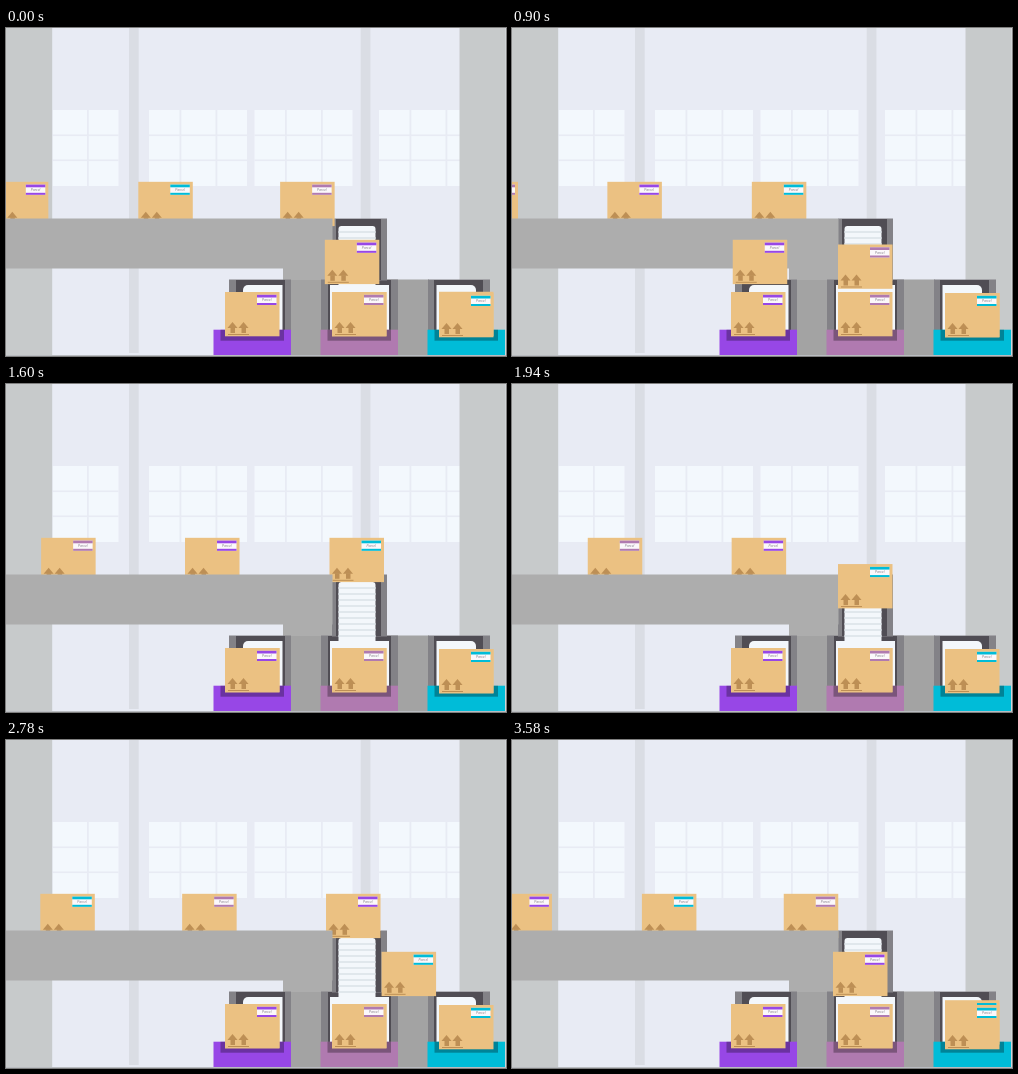
An HTML page with a canvas for the animation above (3.6 s loop, 500 by 328 pixels).

```html
<!DOCTYPE html>
<html lang="en">
<head>
<meta charset="utf-8">
<style>
  html, body { margin: 0; width: 100%; height: 100%; overflow: hidden; }
  canvas { display: block; }
</style>
</head>
<body>
<canvas id="stage" width="500" height="328"></canvas>
<script>
const ctx = document.getElementById('stage').getContext('2d');
const LOOP = 3600, BELT_SPEED = 0.1195;
const EDGE = 326, BIN_GAP = 107;
const BELT_Y = 153.8, SLIDE_Y = 211.8;
const FALL = 704, SLIDE = 982;
const GREY = '#838287', DARK = '#504d54', SLOT = '#f3f7fb';

// side: which bin the parcel goes to; edge: time it leaves the belt;
// drop: duration of the final fall; floor: resting height.
const parcels = [
  { color: '#9747e6', side: -1, edge: 2831, drop: 415, floor: 264 },
  { color: '#b07ab0', side: 0, edge: 435, drop: 898, floor: 264 },
  { color: '#00bcd8', side: 1, edge: 1622, drop: 300, floor: 265 }
];

const mix = (a, b, k) => a + (b - a) * k;
const progress = (time, duration) => Math.min(1, Math.max(0, time / duration));
const binX = side => EDGE + side * BIN_GAP;

function rect(color, x, y, w, h) {
  ctx.fillStyle = color;
  ctx.fillRect(x, y, w, h);
}

function rounded(color, x, y, w, h, radii) {
  ctx.fillStyle = color;
  ctx.beginPath();
  ctx.roundRect(x, y, w, h, radii);
  ctx.fill();
}

function drawParcel(x, y, color) {
  ctx.save();
  ctx.translate(x, y);
  rect('#ebc182', 0, 0, 54.5, 44.3);
  rect('#fbf8fb', 32, 2.8, 19.5, 10.2);
  rect(color, 32, 2.8, 19.5, 2.7);
  rect(color, 32, 11, 19.5, 2);
  ctx.fillStyle = '#857f8a';
  ctx.font = 'italic 3.2px Inter, sans-serif';
  ctx.textAlign = 'center';
  ctx.fillText('Parcel', 41.7, 9.3);
  ctx.fillStyle = '#bd8f55';
  for (const left of [2.5, 13.5]) {
    ctx.beginPath();
    ctx.moveTo(left, 36);
    ctx.lineTo(left + 5, 30);
    ctx.lineTo(left + 10, 36);
    ctx.fill();
    ctx.fillRect(left + 3, 35.5, 4.5, 5.5);
  }
  ctx.fillRect(3, 42, 21, 1);
  ctx.restore();
}

function drawWindow(x) {
  const wall = '#e8ebf4';
  rect('#f3f8fd', x, 82, 98, 76);
  for (const dx of [30.5, 66.5]) rect(wall, x + dx, 82, 1.8, 76);
  for (const dy of [24.5, 49.5]) rect(wall, x, 82 + dy, 98, 1.6);
}

function drawWall() {
  rect('#e8ebf4', 0, 0, 500, 328);
  [14.5, 143, 248.5, 373].forEach(drawWindow);
  for (const x of [123, 354.7]) rect('#dadde4', x, 0, 9.7, 325);
  for (const x of [0, 453.5]) rect('#c7cacb', x, 0, 46.2, 328);
}

function drawChute() {
  rect(GREY, 326, 190.5, 55, 62);
  rect(DARK, 330, 191, 45, 61);
  rounded(SLOT, 332.5, 198, 37, 60, [3, 3, 0, 0]);
  for (let y = 203; y < 256; y += 6) rect('#e0e7ec', 332.5, y, 37, 2);
}

function drawFrame(side) {
  ctx.save();
  ctx.translate(353.5, 0);
  if (side < 0) ctx.scale(-1, 1);
  if (side) {
    rect(GREY, 68.5, 251.5, 62, 51);
    rect(DARK, 74.5, 252, 49, 51);
    rounded(SLOT, 77, 257, 39.5, 46, [0, 5, 0, 0]);
  } else {
    rect(GREY, -38.5, 251.5, 77, 51);
    rect(DARK, -31.5, 252, 63, 51);
    rect(SLOT, -29.5, 257, 59, 46);
  }
  ctx.restore();
}

function drawBin({ side, color }) {
  const left = binX(side) - 11.5;
  drawFrame(side);
  rect(color, left, 301.7, 77.5, 27);
  rect('rgba(0, 0, 0, 0.3)', left + 7, 301.7, 63.5, 11);
}

function drawBelt() {
  rect('#adadad', 0, 190.5, 326.5, 50);
}

function drawStands() {
  rect('#a3a3a3', 277, 251.5, 50, 77);
  rect('#a3a3a3', 381, 251.5, 42, 77);
  rect('#adadad', 277, 240, 50, 12);
}

function drawDelivery({ side, color, drop, floor }, age) {
  let y;
  if (side) {
    y = mix(BELT_Y, SLIDE_Y, progress(age, FALL));
    y = mix(y, floor, progress(age - FALL - SLIDE, drop));
  } else {
    y = mix(BELT_Y, floor, 1 - (1 - progress(age, drop)) ** 1.15);
  }
  const x = mix(EDGE, binX(side), progress(age - FALL, SLIDE));
  drawParcel(x, y, color);
}

function draw(t) {
  const ageOf = p => (t - p.edge + LOOP) % LOOP;
  drawWall();
  drawStands();
  parcels.forEach(drawBin);
  drawChute();
  for (const p of parcels) drawParcel(EDGE + (ageOf(p) - LOOP) * BELT_SPEED, BELT_Y, p.color);
  drawBelt();
  for (const p of parcels) drawDelivery(p, ageOf(p));
  for (const p of parcels) drawParcel(binX(p.side), p.floor, p.color);
  rect('#b9bcc0', 0, 327, 500, 1);
}

const start = performance.now();
function tick() {
  draw((performance.now() - start) % LOOP);
  requestAnimationFrame(tick);
}
tick();
</script>
</body>
</html>
```
